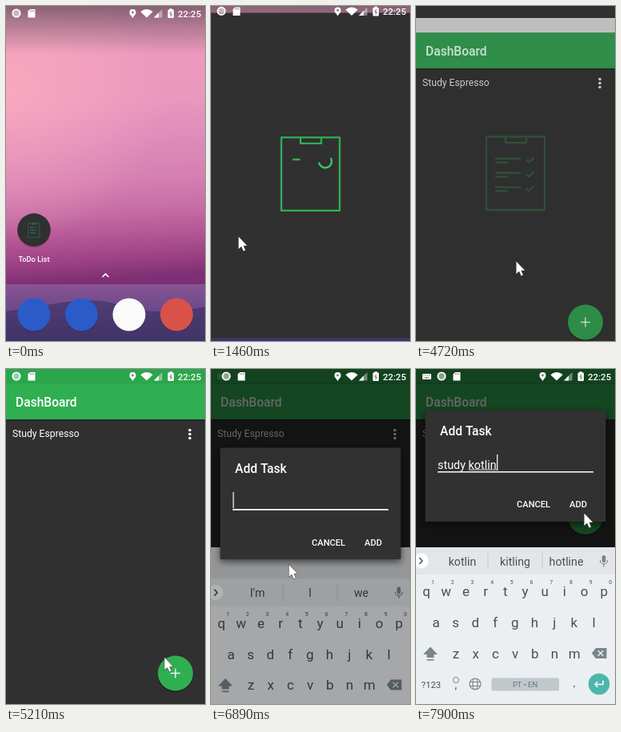
Animation of 249 by 419 pixels, one loop 8000 ms. Source, as an HTML page with a canvas:

```html
<!DOCTYPE html>
<html lang="en">
<head>
<meta charset="utf-8">
<title>To-do app demo</title>
<style>
  html, body { margin: 0; width: 100%; height: 100%; overflow: hidden; background: #303030; }
  canvas { display: block; width: 100vw; height: 100vh; }
</style>
</head>
<body>
<canvas></canvas>
<script>
const W = 249, H = 419, LOOP = 8000;
const GREEN = '#30af52', DARK = '#303030', KEY = '#455157';
const canvas = document.querySelector('canvas');
const c = canvas.getContext('2d');
const dpr = window.devicePixelRatio || 1;
canvas.width = W * dpr;
canvas.height = H * dpr;

// Timing helpers
const mix = (a, b, p) => a + (b - a) * p;
const prog = (t, from, to) => Math.min(1, Math.max(0, (t - from) / (to - from)));
const easeOut = (p, power = 2) => 1 - (1 - p) ** power;

// Drawing helpers
function layer(draw, { x = 0, y = 0, alpha = 1, scale = 1 } = {}) {
  c.save();
  c.translate(x, y);
  c.scale(scale, scale);
  c.globalAlpha *= alpha;
  draw();
  c.restore();
}
function rect(x, y, w, h, fill, radius = 0) {
  c.fillStyle = fill;
  c.beginPath();
  c.roundRect(x, y, w, h, radius);
  c.fill();
}
function disc(x, y, r, fill) {
  c.fillStyle = fill;
  c.beginPath();
  c.arc(x, y, r, 0, 7);
  c.fill();
}
function stroke(color, width, path) {
  c.strokeStyle = color;
  c.lineWidth = width;
  c.lineCap = c.lineJoin = 'round';
  c.beginPath();
  path();
  c.stroke();
}
const trace = points => points.forEach(([x, y]) => c.lineTo(x, y));
const line = (points, color, width) => stroke(color, width, () => trace(points));
function poly(points, fill) {
  c.fillStyle = fill;
  c.beginPath();
  trace(points);
  c.fill();
}
function text(str, x, y, size, color, { weight = 400, align = 'left' } = {}) {
  c.font = `${weight} ${size}px Roboto, sans-serif`;
  c.textAlign = align;
  c.textBaseline = 'alphabetic';
  c.fillStyle = color;
  c.fillText(str, x, y + size * 0.355);
  return c.measureText(str).width;
}
const centered = (str, x, y, size, color, weight = 400) =>
  text(str, x, y, size, color, { weight, align: 'center' });
function withStops(gradient, stops) {
  stops.forEach(([at, color]) => gradient.addColorStop(at, color));
  return gradient;
}
const linear = (x0, y0, x1, y1, stops) => withStops(c.createLinearGradient(x0, y0, x1, y1), stops);
const radial = (x, y, r, stops) => withStops(c.createRadialGradient(x, y, 0, x, y, r), stops);

// keyboardIcon runs from 0 (absent) to 1 (other icons pushed fully aside).
function statusBar(y, keyboardIcon) {
  const white = '#fff';
  layer(() => {
    layer(() => {
      rect(8, 6, 11, 7, white, 1);
      for (let i = 0; i < 4; i++) rect(9.3 + i * 2.3, 7.5, 1, 1, '#555');
      rect(10.5, 10.5, 6, 1, '#555');
    }, { alpha: keyboardIcon ** 2 });
    layer(() => {
      disc(13, 9, 4, 'rgba(255,255,255,.5)');
      stroke(white, 1.9, () => c.arc(13, 9, 4.6, 0, 7));
      poly([[30, 4], [36.5, 4], [36.5, 14.5], [27.5, 14.5], [27.5, 6.5]], white);
      for (const x of [30, 32, 34]) rect(x, 5.2, 1, 2, '#888');
    }, { x: keyboardIcon * 19 });
    poly([[154.8, 9.5], [162.2, 9.5], [158.5, 15]], white);
    disc(158.5, 8, 4, white);
    disc(158.5, 8, 1.4, '#777');
    c.fillStyle = white;
    c.beginPath();
    c.moveTo(176, 14.5);
    c.arc(176, 14.5, 10.5, -Math.PI * 0.76, -Math.PI * 0.24);
    c.fill();
    poly([[185, 14.5], [195.5, 4], [195.5, 14.5]], 'rgba(255,255,255,.4)');
    poly([[185, 14.5], [191, 8.5], [191, 14.5]], white);
    rect(202.5, 4.5, 7.5, 10.5, white, 1);
    rect(204.5, 3.3, 3.5, 2, white);
    line([[206.7, 7], [205, 10], [207.5, 10], [206, 12.8]], '#666', 1);
    text('22:25', 215, 9.5, 11.5, white, { weight: 500 });
  }, { y });
}

function check(y, color) {
  line([[138.5, y], [141, y + 2.6], [147, y - 2.6]], color, 2.2);
}

function board(color) {
  stroke(color, 2.3, () => {
    c.rect(88, 163.5, 73, 91.5);
    c.rect(112, 163.5, 26, 7.5);
  });
}

// A row draws its lines while a spinner turns, then the spinner becomes a tick.
function taskRow(index, t, start, done) {
  if (t < start) return;
  const age = t - start, y = 191 + index * 17.8;
  const long = prog(age, 0, 500);
  const short = prog(age, 230, 620);
  line([[mix(104, 100, long), y], [mix(105, 130, long), y]], GREEN, 2.4);
  if (short > 0) line([[mix(89, 100, short), y + 4.8], [mix(90, 114, short), y + 4.8]], GREEN, 2.4);
  if (t < done) {
    const from = (-175 + age * 1.35) * Math.PI / 180;
    stroke('#38c95f', 2.3, () => c.arc(143, y + 2.3, 8, from, from + mix(3.3, 2.7, prog(age, 110, 470))));
  } else {
    layer(() => check(y + 2, GREEN), { alpha: prog(t, done - 40, done + 120) });
  }
}

function splash(t) {
  rect(0, 0, W, H, DARK);
  board(GREEN);
  taskRow(0, t, 1350, 2010);
  taskRow(1, t, 2000, 2860);
  taskRow(2, t, 2900, 3700);
}

function home() {
  rect(0, 0, W, H, linear(0, 0, 25, H, [
    [0, '#e897b8'], [0.14, '#ec99bc'], [0.3, '#ea98bd'], [0.42, '#de8cba'], [0.54, '#d57fb2'],
    [0.63, '#c76da6'], [0.71, '#b25493'], [0.78, '#983f82'], [0.83, '#7f2f74'], [1, '#5b3470']]));
  rect(0, 0, W, 349, radial(10, 105, 190, [[0, 'rgba(255,175,192,.65)'], [1, 'rgba(255,175,192,0)']]));
  rect(0, 0, W, 60, linear(0, 0, 0, 60, [[0, 'rgba(70,60,70,.6)'], [1, 'rgba(70,60,70,0)']]));
  rect(0, 348, W, 71, linear(0, 348, 0, H, [[0, '#895394'], [0.4, '#6f4b8b'], [1, '#4b3c70']]));
  c.fillStyle = 'rgba(58,48,98,.6)';
  c.beginPath();
  c.moveTo(0, 382);
  c.bezierCurveTo(55, 374, 100, 362, 135, 372);
  c.bezierCurveTo(175, 386, 215, 384, W, 376);
  c.lineTo(W, H);
  c.lineTo(0, H);
  c.fill();

  disc(35, 281, 21, 'rgba(0,0,0,.2)');
  disc(35, 280, 20.7, DARK);
  layer(() => {
    board('#2b9a6b');
    for (let i = 0; i < 3; i++) {
      line([[100, 191 + i * 18], [130, 191 + i * 18]], '#2b9a6b', 4);
      check(193 + i * 18, '#2b9a6b');
    }
  }, { x: 35 - 124.5 * 0.19, y: 280.5 - 209 * 0.19, scale: 0.19 });
  centered('ToDo List', 35, 316.5, 9.3, '#fff', 500);
  line([[121, 338.5], [124.5, 335], [128, 338.5]], '#fff', 1.7);

  ['#2a5bc9', '#2a5bc9', '#fafafa', '#d9524a'].forEach((color, i) => {
    disc(35 + i * 59.5, 387, 20.5, 'rgba(0,0,0,.2)');
    disc(35 + i * 59.5, 386, 20.5, color);
  });
}

function dashboard(t, fabY) {
  rect(0, 0, W, 18.5, t < 4960 ? '#efefef' : '#2ca64c');
  rect(0, 18.5, W, 44.5, GREEN);
  rect(0, 63, W, H, DARK);
  rect(0, 63, W, 2, 'rgba(0,0,0,.2)');
  text('DashBoard', 12, 41.5, 15.6, '#fff', { weight: 500 });
  text('Study Espresso', 8, 81, 12.2, '#fff');
  for (const dy of [-5, 0, 5]) disc(230, 81.5 + dy, 1.8, '#fff');
  disc(212, fabY + 2, 22.5, 'rgba(0,0,0,.2)');
  disc(212, fabY, 22, GREEN);
  const press = prog(t, 5450, 5700) * (1 - prog(t, 5980, 6150));
  if (press) {
    disc(212, fabY, 22, `rgba(0,0,0,${0.2 * press})`);
    disc(212, fabY, 9, `rgba(120,255,160,${0.14 * press})`);
  }
  line([[206.5, fabY], [217.5, fabY]], '#eee', 1.5);
  line([[212, fabY - 5.5], [212, fabY + 5.5]], '#eee', 1.5);
}

function dialog(t, y, typed) {
  layer(() => {
    c.shadowColor = 'rgba(0,0,0,.6)';
    c.shadowBlur = 9 * dpr;
    c.shadowOffsetY = 3 * dpr;
    rect(11.5, 0, 226, 139.5, '#313131', 1);
    c.shadowColor = 'transparent';
    text('Add Task', 30, 25.6, 15.6, '#fff', { weight: 500 });
    rect(27, 76.5, 195, 1.6, '#fff');
    const width = text(typed, 27, 68, 14.4, '#fff');
    const word = typed.split(' ').pop();
    if (word) {
      const wordWidth = c.measureText(word).width;
      rect(27 + width - wordWidth, 74, wordWidth, 1, '#ddd');
    }
    if (t < 6240 || t > 6450) rect(27.4 + width, 55.5, 1.2, 20, '#fff');
    text('CANCEL', 126, 118, 11.1, '#fff', { weight: 500 });
    text('ADD', 192, 118, 11.1, '#fff', { weight: 500 });
  }, { y });
}

function suggestions(typed) {
  if (!typed) return ["I'm", 'I', 'we'];
  return typed.length < 7 ? ['study', 'studying', 'studio'] : ['kotlin', 'kitling', 'hotline'];
}

function keyboard(typed) {
  rect(0, 223, W, 196, '#eceff1');
  rect(0, 223, W, 34, '#e2e6e9');
  disc(6, 240, 9.5, '#fff');
  line([[4.5, 236.5], [8, 240], [4.5, 243.5]], KEY, 1.5);
  suggestions(typed).forEach((word, i) => centered(word, [58, 124, 188][i], 240.5, 14.2, KEY));
  for (const x of [90, 158]) rect(x - 0.5, 230, 1, 20, '#c2c9cd');
  rect(232.7, 233, 4.6, 9, '#78858b', 2.3);
  stroke('#78858b', 1.2, () => c.arc(235, 239.5, 4.5, 0, Math.PI));
  rect(234.4, 243.5, 1.2, 4, '#78858b');

  [['qwertyuiop', 13, 278], ['asdfghjkl', 25, 317], ['zxcvbnm', 50, 355.5]].forEach(([row, x0, y], r) =>
    [...row].forEach((key, i) => {
      const x = x0 + i * 24.7;
      centered(key, x, y, 17, KEY);
      if (r === 0) centered((i + 1) % 10, x + 8, y - 11.5, 7, KEY);
    }));
  poly([[18, 347.5], [27, 357], [22.5, 357], [22.5, 361], [13.5, 361], [13.5, 357], [9, 357]], '#78858b');
  rect(13.5, 363, 9, 1.6, '#78858b');
  poly([[220, 355.5], [225, 349], [238.5, 349], [238.5, 362], [225, 362]], '#78858b');
  line([[228, 352.5], [234, 358.5]], '#eceff1', 1.4);
  line([[234, 352.5], [228, 358.5]], '#eceff1', 1.4);

  centered('?123', 19, 394.5, 11.3, KEY);
  stroke('#78858b', 1, () => c.arc(50, 389, 3.6, 0, 7));
  centered(',', 50, 395, 14, KEY);
  stroke('#78858b', 1.2, () => {
    c.arc(74, 394, 7, 0, 7);
    c.moveTo(77, 394);
    c.ellipse(74, 394, 3, 7, 0, 0, 7);
    c.moveTo(67.5, 391.5);
    c.lineTo(80.5, 391.5);
    c.moveTo(67.5, 396.5);
    c.lineTo(80.5, 396.5);
  });
  rect(94.5, 386.5, 84.5, 16, '#c1c8cc', 1.5);
  centered('PT • EN', 136.5, 394.5, 9.3, '#66737a');
  centered('.', 198, 392, 17, KEY);
  disc(229, 394, 13.3, '#4db6ac');
  line([[234, 390], [234, 394.5], [224, 394.5]], '#fff', 1.5);
  line([[227, 391.5], [224, 394.5], [227, 397.5]], '#fff', 1.5);
}

// Pointer stops: time, x, y
const POINTER = [
  [230, 175, 419], [800, 24, 277], [1010, 34, 288], [3760, 34, 288], [4390, 134, 290],
  [4490, 134, 292], [4720, 125, 319], [5250, 199, 361], [5950, 199, 361], [6190, 124, 266],
  [6670, 97, 244], [6950, 97, 244], [7570, 205, 180], [7650, 205, 180], [7700, 209, 180],
  [7850, 209, 180], [7900, 210, 180], [LOOP, 210, 180]
];
function pointer(t) {
  const next = POINTER.findIndex(stop => stop[0] > t);
  if (next < 1) return;
  const [t0, x0, y0] = POINTER[next - 1], [t1, x1, y1] = POINTER[next];
  let p = prog(t, t0, t1);
  p = p * p * (3 - 2 * p);
  layer(() => {
    const shape = [[0.5, 0.5], [0.5, 16], [4, 12.8], [6.6, 18.5], [9, 17.5], [6.6, 11.8], [11.2, 11.8], [0.5, 0.5]];
    line(shape, '#222', 1);
    poly(shape, '#fff');
  }, { x: mix(x0, x1, p), y: mix(y0, y1, p) });
}

function launch(t) {
  home();
  if (t >= 1090) {
    // The window opens out of the launcher icon's box.
    const grow = easeOut(prog(t, 1090, 1530), 1.85);
    const widen = Math.min(1, grow * 1.2);
    const left = mix(14, 0, widen), right = mix(56, W, widen);
    const top = mix(260, 0, grow), bottom = mix(302, H, grow);
    c.save();
    c.beginPath();
    c.rect(left, top, right - left, bottom - top);
    c.clip();
    layer(() => splash(t), { y: 30 * (1 - grow), alpha: prog(t, 1090, 1200) });
    c.restore();
  }
  statusBar(-18 * prog(t, 1400, 1560) ** 2, 0);
}

function appScreen(t) {
  const typed = 'study kotlin'.slice(0, Math.max(0, Math.floor((t - 7020) / 43)));
  const keyboardUp = t >= 6820;
  const slide = prog(t, 6820, 7000);
  const enter = prog(t, 4490, 4800);

  if (enter < 1) splash(t);
  layer(() => dashboard(t, keyboardUp ? 185 : 380.5), {
    y: 33 * (1 - easeOut(prog(t, 4500, 5180))), alpha: enter
  });
  const dim = 0.6 * prog(t, 5845, 6030);
  if (dim) rect(0, 0, W, H, `rgba(0,0,0,${dim})`);
  if (keyboardUp) {
    rect(0, 223, W, 196, '#d4d6d8');
    layer(() => keyboard(typed), { y: 108 * (1 - easeOut(slide)) });
    rect(0, 223, W, 196, `rgba(0,0,0,${1 - easeOut(slide, 2.4)})`);
  }
  if (t >= 5845) {
    layer(() => dialog(t, mix(149, 51.5, easeOut(slide, 1.45)), typed), { alpha: prog(t, 5840, 5930) });
  }
  if (t > 4850) statusBar(-18 * (1 - easeOut(prog(t, 4850, 5050))), prog(t, 6840, 7000));
}

function render(t) {
  c.setTransform(dpr, 0, 0, dpr, 0, 0);
  if (t < 1560) launch(t);
  else if (t < 4490) splash(t);
  else appScreen(t);
  pointer(t);
}

const began = performance.now();
function tick() {
  render((performance.now() - began) % LOOP);
  requestAnimationFrame(tick);
}
tick();
</script>
</body>
</html>
```
